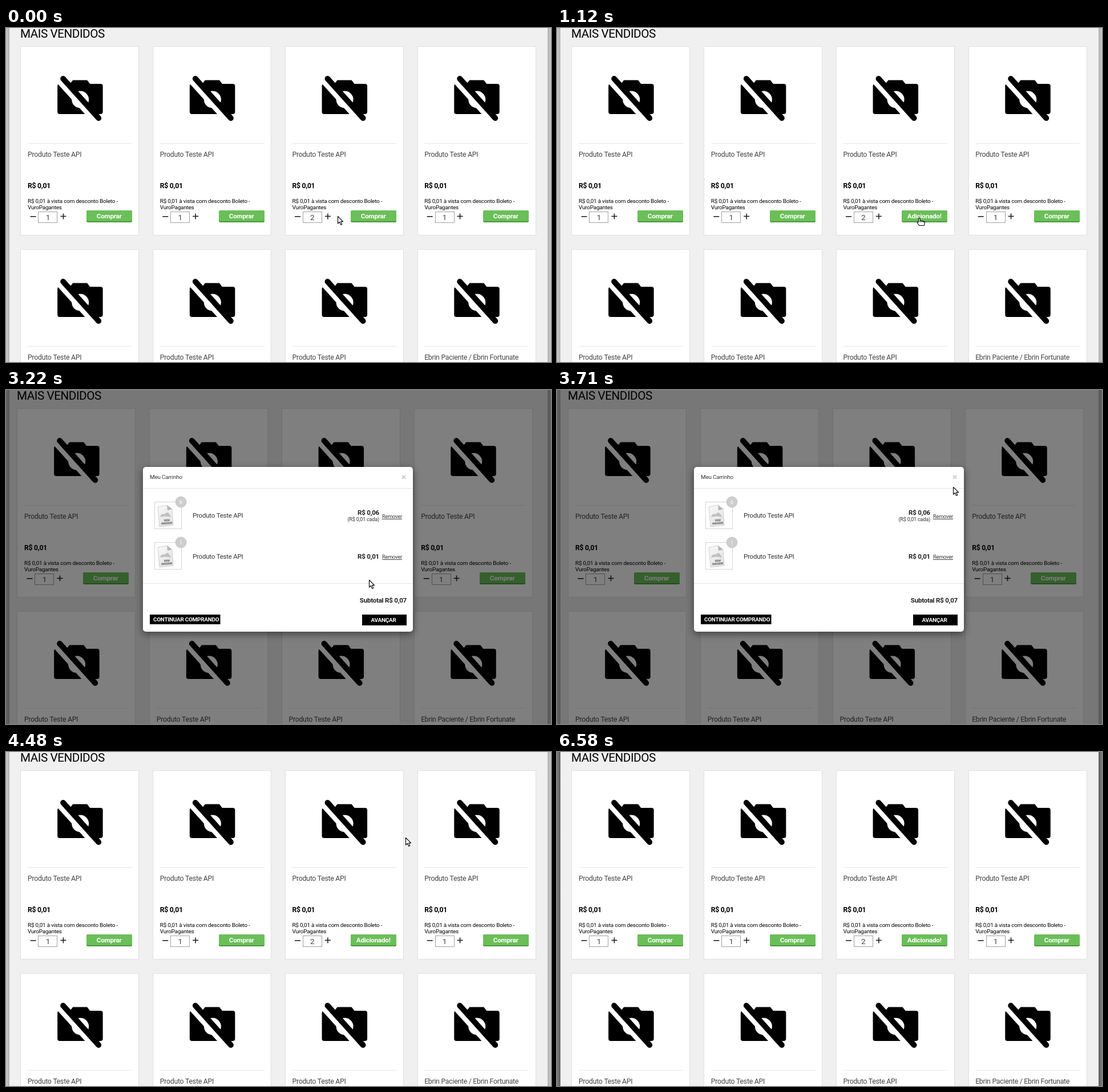
Recreate the animation shown at these times as an HTML page with a canvas. Size 955 by 586 pixels, loop 6720 ms.

```html
<!DOCTYPE html>
<html lang="pt-BR">
<head>
<meta charset="utf-8">
<title>Mais vendidos</title>
<style>
html, body { margin: 0; width: 100%; height: 100%; overflow: hidden; background: #f0f0f0; }
canvas { display: block; }
</style>
</head>
<body>
<canvas id="stage" width="955" height="586"></canvas>
<script>
const W = 955, H = 586, LOOP = 6720, STEP = 70;
const TRACKING = -.022; // em
const g = document.getElementById('stage').getContext('2d');

const ADDED = 1120, OPEN = 2030, HOVER = 3920, CLOSE = 4480, DARK_EDGE = 6580;

// Cursor moves: start time, steps, from, to, upward bow
const MOVES = [
  { at: 70, steps: 7, from: [581, 330], to: [635, 334], bow: 4 },
  { at: 3220, steps: 10, from: [635, 334], to: [698, 160], bow: 0 },
  { at: 4060, steps: 3, from: [698, 160], to: [700, 150], bow: 0 },
  { at: 5740, steps: 9, from: [700, 150], to: [503, -18], bow: 0 }
];

const ARROW = new Path2D('M.5 .5V13.2L3.5 10.4L5.6 15.3L7.8 14.4L5.7 9.6H9.6Z');
const HAND = new Path2D('M-1.4 6.5V.7a1.3 1.3 0 0 1 2.6 0V4l6 1.1q2.3.5 2.2 2.6l-1 4.8H-.4l-3-4.3q-.7-1.8.9-1.9z');
const FINGERS = new Path2D('M1.2 4V7M3.9 4.6V7M6.6 5.1V7.4');
const CAMERA = new Path2D('M4 14H22L27 7.5H52L57 14H75.5Q79.5 14 79.5 18V63Q79.5 67 75.5 67H4Q0 67 0 63V18Q0 14 4 14Z');
const SHEET = new Path2D('M6 9L22 6L31 13L33 41L9 44Z');
const FOLD = new Path2D('M22 6L23 15L31 13Z');
const HILL = new Path2D('M10 27Q12 20 18 22Q24 14 29 27Q20 24 10 27Z');

function rect(x, y, w, h, color, radius = 0) {
  g.fillStyle = color;
  g.beginPath();
  g.roundRect(x, y, w, h, radius);
  g.fill();
}

function frame(x, y, w, h, color) {
  g.strokeStyle = color;
  g.lineWidth = 1;
  g.strokeRect(x + .5, y + .5, w - 1, h - 1);
}

function line(x1, y1, x2, y2, color, width, cap = 'butt') {
  g.strokeStyle = color;
  g.lineWidth = width;
  g.lineCap = cap;
  g.beginPath();
  g.moveTo(x1, y1);
  g.lineTo(x2, y2);
  g.stroke();
}

function disc(x, y, r, color) {
  g.fillStyle = color;
  g.beginPath();
  g.arc(x, y, r, 0, 7);
  g.fill();
}

function text(str, x, y, size, color, weight = 400, align = 'left') {
  g.font = `${weight} ${size}px Roboto, sans-serif`;
  g.letterSpacing = `${size * TRACKING}px`;
  g.fillStyle = color;
  g.textAlign = align;
  g.fillText(str, x, y);
}

function noPhoto(x, y) {
  g.save();
  g.translate(x, y);
  g.fillStyle = '#000';
  g.fill(CAMERA);
  disc(40, 41.5, 15, '#fff');
  line(1, 8, 66, 80, '#fff', 9);
  line(10, 5, 72, 74, '#000', 10, 'round');
  g.restore();
}

function card(x, y, name, count, label) {
  const left = Math.round(x), inner = x + 12.6, button = Math.round(x + 115.55);
  rect(left, y, 208, 332, '#fff');
  frame(left, y, 208, 332, '#e0e0e0');
  noPhoto(x + 64.7, y + 52);
  rect(Math.round(inner), y + 170, 183, 1, '#e8e8e8');
  text(name, inner, y + 194, 12.3, '#444');
  text('R$ 0,01', inner, y + 249, 12.2, '#000', 700);
  text('R$ 0,01 à vista com desconto Boleto -', inner, y + 275, 9.95, '#000');
  text('VuroPagantes', inner, y + 286, 9.95, '#000');

  rect(inner + 4.5, y + 298, 10, 1.6, '#222');
  frame(Math.round(x + 31), y + 290, 34, 20, '#a0a0a0');
  text(count, x + 47.9, y + 305, 13.6, '#444', 400, 'center');
  rect(x + 70, y + 297.6, 10, 1.6, '#222');
  rect(x + 74.2, y + 293.4, 1.6, 10, '#222');

  rect(button, y + 288, 80, 21, '#4a9a3a', 2.5);
  rect(button, y + 288, 80, 19, '#6abf58', 2.5);
  text(label, button + 39.7, y + 301.5, 11.7, '#fff', 700, 'center');
}

function edges(dark) {
  const [outer, inner] = dark ? ['#7c7c7c', '#5e5e5e'] : ['#c9c9c9', '#b2b2b2'];
  for (const [x0, x1] of [[0, 6], [W, W - 6]]) {
    const shade = g.createLinearGradient(x0, 0, x1, 0);
    shade.addColorStop(0, outer);
    shade.addColorStop(1, inner);
    rect(Math.min(x0, x1), 0, 6, H, shade);
  }
}

function shop(t, shift) {
  rect(0, 0, W, H, '#f0f0f0');
  text('MAIS VENDIDOS', 25 + shift, 16.5, 20.7, '#000');
  for (let row = 0; row < 2; row++) {
    for (let col = 0; col < 4; col++) {
      const x = 25.45 + col * 231.7 + shift;
      const name = row && col === 3 ? 'Ebrin Paciente / Ebrin Fortunate' : 'Produto Teste API';
      const chosen = !row && col === 2;
      const label = chosen && t >= ADDED ? 'Adicionado!' : 'Comprar';
      card(x, row ? 388 : 32, name, chosen ? '2' : '1', label);
    }
  }
  edges(t >= DARK_EDGE);
}

function thumbnail(x, y, count) {
  rect(x, y, 48, 48, '#fff');
  frame(x, y, 48, 48, '#d4d4d4');
  g.save();
  g.translate(x, y);
  const paper = g.createLinearGradient(6, 6, 32, 44);
  paper.addColorStop(0, '#fafafa');
  paper.addColorStop(1, '#dedede');
  g.fillStyle = paper;
  g.fill(SHEET);
  g.strokeStyle = '#c8c8c8';
  g.lineWidth = .8;
  g.stroke(SHEET);
  g.fillStyle = '#b5b5b5';
  g.fill(FOLD);
  g.fillStyle = '#c0c0c0';
  g.fill(HILL);
  g.rotate(-.08);
  text('SEM', 19, 36, 5, '#555', 700, 'center');
  text('IMAGEM', 18.5, 41, 5, '#555', 700, 'center');
  g.restore();
  disc(x + 46.5, y + .5, 10, '#cdcdcd');
  text(count, x + 46.5, y + 3.5, 9, '#fff', 400, 'center');
}

function removeLink(y) {
  text('Remover', 659, y, 9.25, '#333');
  rect(659, Math.round(y + 1), 35, 1, '#444');
}

function cart(t) {
  rect(0, 0, W, H, 'rgba(0,0,0,.5)');
  g.save();
  g.shadowColor = 'rgba(0,0,0,.5)';
  g.shadowBlur = 14;
  g.shadowOffsetY = 4;
  rect(240, 135, 473, 289, '#fff', 5);
  g.restore();

  text('Meu Carrinho', 252, 156, 9.95, '#333');
  const cross = t >= HOVER ? '#808080' : '#ccc';
  line(694, 150, 700, 156, cross, 1.8);
  line(700, 150, 694, 156, cross, 1.8);
  rect(240, 172, 473, 1, '#e5e5e5');
  rect(240, 339, 473, 1, '#e5e5e5');

  thumbnail(260, 196, '6');
  text('Produto Teste API', 327, 224, 11.55, '#333');
  text('R$ 0,06', 654, 218.5, 11.6, '#222', 700, 'right');
  text('(R$ 0,01 cada)', 654, 230, 9.1, '#333', 400, 'right');
  removeLink(224.5);

  thumbnail(260, 267, '1');
  text('Produto Teste API', 327, 295.5, 11.55, '#333');
  text('R$ 0,01', 654, 295.5, 11.6, '#222', 700, 'right');
  removeLink(295.5);

  text('Subtotal R$ 0,07', 702, 373, 11.6, '#222', 700, 'right');
  rect(252, 394, 123.5, 17, '#000');
  text('CONTINUAR COMPRANDO', 258, 405.5, 9.9, '#fff', 700);
  rect(624, 394, 78, 19, '#000');
  text('AVANÇAR', 661.5, 407, 9.95, '#fff', 700, 'center');
}

const smooth = p => p * p * p * (p * (p * 6 - 15) + 10);

function cursorAt(t) {
  const move = MOVES.filter(m => t >= m.at).pop();
  if (!move) return MOVES[0].from;
  const { at, steps, from, to, bow } = move;
  const p = smooth(Math.min(1, (Math.floor((t - at) / STEP) + 1) / steps));
  return [
    Math.round(from[0] + (to[0] - from[0]) * p),
    Math.round(from[1] + (to[1] - from[1]) * p - bow * Math.sin(Math.PI * p))
  ];
}

function cursor(t, open) {
  const [x, y] = cursorAt(t);
  const hand = open ? x > 690 && y < 162 : t < OPEN && x >= 604;
  const shape = hand ? HAND : ARROW;
  g.save();
  g.translate(x, y);
  g.lineJoin = 'round';
  g.lineWidth = 1.1;
  g.fillStyle = '#fff';
  g.strokeStyle = '#000';
  g.fill(shape);
  g.stroke(shape);
  if (hand) {
    g.lineWidth = .9;
    g.stroke(FINGERS);
  }
  g.restore();
}

function draw(now) {
  const t = now % LOOP;
  const open = t >= OPEN && t < CLOSE;
  shop(t, open ? -6 : 0);
  if (open) cart(t);
  cursor(t, open);
}

let start;
function tick(now) {
  start ??= now;
  draw(now - start);
  requestAnimationFrame(tick);
}
draw(0);
requestAnimationFrame(tick);
</script>
</body>
</html>
```
